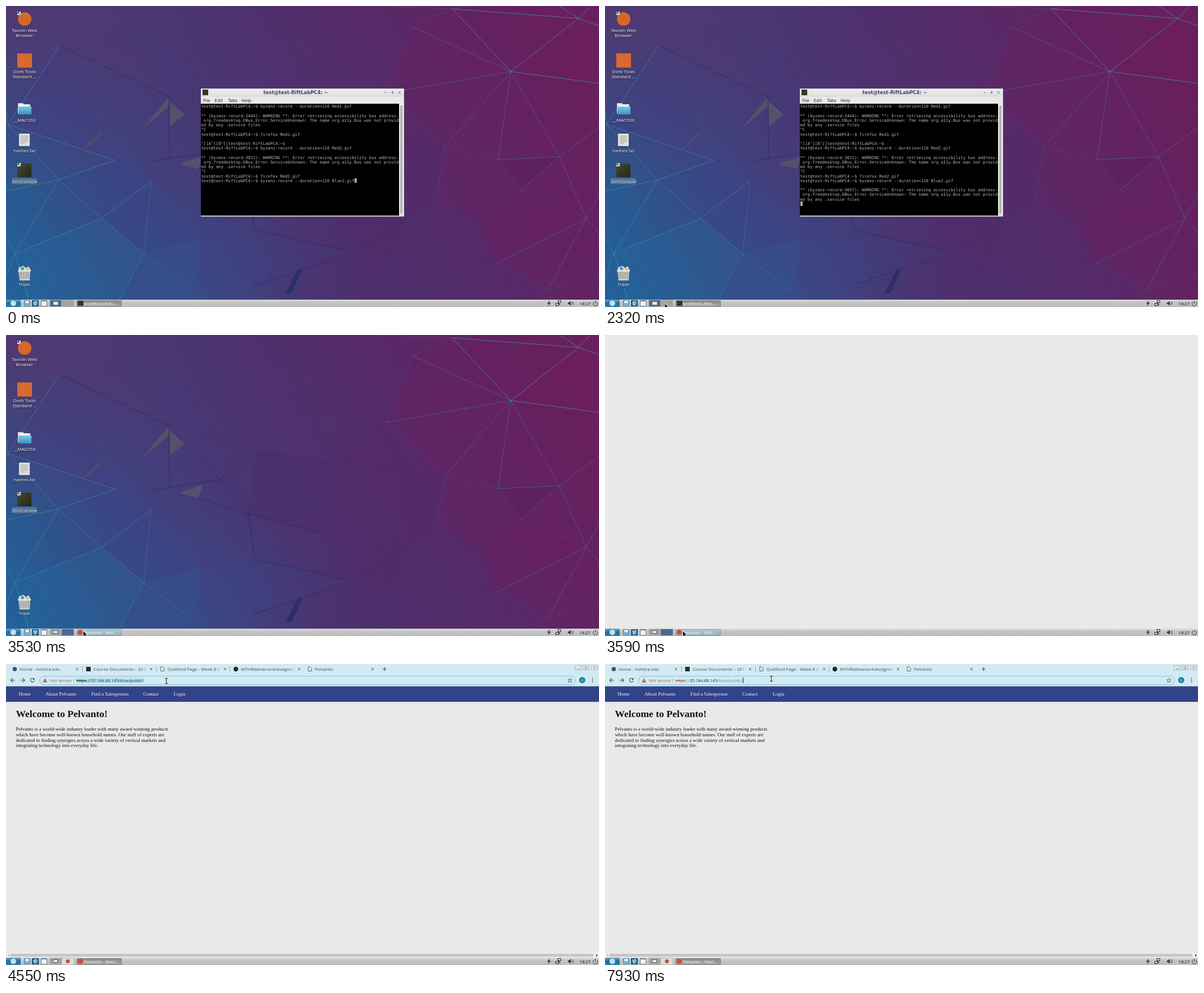
Write an HTML page with a canvas that moves like this. It is 1050 px wide and 533 px high and loops after 8 s.

```html
<!DOCTYPE html>
<html lang="en">
<head>
<meta charset="utf-8">
<title>Desktop session</title>
<style>
html, body { margin: 0; width: 100%; height: 100%; overflow: hidden; background: #e9e9e9; }
canvas { display: block; }
</style>
</head>
<body>
<canvas id="stage" width="1050" height="533"></canvas>
<script>
const W = 1050, H = 533, LOOP = 8000;
const UI = '"Open Sans", sans-serif', DJV = '"DejaVu Sans", sans-serif';
const MONO = '"DejaVu Sans Mono", monospace', SERIF = '"Liberation Serif", serif';
const screenCtx = document.getElementById('stage').getContext('2d');
let c = screenCtx;

function box(x, y, w, h, color) { c.fillStyle = color; c.fillRect(x, y, w, h); }
function frame(x, y, w, h, color) {
  c.strokeStyle = color; c.lineWidth = 1; c.strokeRect(x + .5, y + .5, w - 1, h - 1);
}
function disc(x, y, r, color) {
  c.fillStyle = color; c.beginPath(); c.arc(x, y, r, 0, 7); c.fill();
}
function shape(path, color) { c.fillStyle = color; c.fill(new Path2D(path)); }
function line(path, color, width = 1) {
  c.strokeStyle = color; c.lineWidth = width; c.stroke(new Path2D(path));
}
function text(s, x, y, font, color, align = 'left') {
  c.font = font; c.fillStyle = color; c.textAlign = align; c.fillText(s, x, y);
}
function shade(x0, y0, x1, y1, ...colors) {
  const g = c.createLinearGradient(x0, y0, x1, y1);
  colors.forEach((k, i) => g.addColorStop(i / (colors.length - 1), k));
  return g;
}
function glow(x, y, r, rgb, alpha) {
  const g = c.createRadialGradient(x, y, 0, x, y, r);
  g.addColorStop(0, `rgba(${rgb},${alpha})`);
  g.addColorStop(1, `rgba(${rgb},0)`);
  box(0, 0, W, H, g);
}
// Lines from one hub to several spokes, given as "x,y x,y ..."
function fan(hub, spokes, color) {
  line(spokes.split(' ').map(p => `M${hub}L${p}`).join(''), color, .8);
}

function wallpaper() {
  box(0, 0, W, H, shade(0, 520, 1050, 0, '#22629a', '#2b578f', '#3a4883', '#433e7b',
    '#483774', '#4d326f', '#522e6a', '#592867', '#602462', '#65215f', '#68205f'));
  glow(0, 0, 330, '86,52,108', .8);
  glow(330, 500, 220, '48,82,142', .45);
  glow(700, 500, 260, '78,42,105', .45);

  shape('M169,376L244,439L200,533H40L16,438Z', 'rgba(32,108,160,.25)');
  shape('M244,439L347,415L332,505L300,533H200Z', 'rgba(44,90,150,.25)');
  shape('M93,308L193,273L257,310L169,376Z', 'rgba(50,70,145,.2)');
  shape('M257,310L347,415L244,439L169,376Z', 'rgba(52,72,142,.2)');
  shape('M0,180L95,70L193,273L3,210Z', 'rgba(64,62,130,.3)');
  shape('M443,205L568,222L555,350L429,317Z', 'rgba(76,42,106,.35)');
  shape('M347,415L440,397L610,435L437,495Z', 'rgba(56,66,136,.15)');
  shape('M568,222L672,155L776,250L760,340L710,373L665,475L555,350Z', 'rgba(84,38,100,.25)');
  shape('M720,37L790,5L1050,0V533L960,502L870,455L840,385L763,340L776,250L672,155Z', 'rgba(108,28,92,.25)');
  shape('M894,116L1014,22L1050,35V137Z', 'rgba(120,28,90,.2)');
  shape('M871,272L980,267L912,326Z', 'rgba(75,30,95,.25)');
  shape('M912,326L1027,376L870,455L840,385Z', 'rgba(110,25,90,.2)');
  shape('M0,0H194L288,160L95,70Z', 'rgba(85,55,110,.2)');
  shape('M430,0L555,70L520,130L597,147L568,222L443,205L390,140Z', 'rgba(80,50,112,.2)');

  const dark = 'rgba(28,28,76,.6)', faint = 'rgba(40,34,92,.3)';
  fan('288,160', '95,70 380,256 290,275', dark);
  fan('288,160', '194,0 443,205 318,130', faint);
  fan('429,317', '380,256 310,278 440,397 555,350', dark);
  fan('429,317', '347,415', faint);
  fan('440,397', '610,435', dark);
  fan('440,397', '520,365 437,495 347,415', faint);
  fan('380,256', '255,275 413,228', dark);
  fan('555,70', '390,20 430,0 645,75 520,130 597,147', faint);
  fan('568,222', '443,205 597,147 555,350 776,250', faint);
  fan('581,447', '437,495', dark);
  fan('672,155', '597,147 645,75 568,222', faint);

  const bright = 'rgba(56,166,180,.85)', teal = 'rgba(50,140,158,.65)', soft = 'rgba(58,110,140,.4)';
  fan('894,116', '790,5 1014,22 1050,137', bright);
  fan('894,116', '720,37 980,267 871,272 776,250 672,155', teal);
  fan('1014,22', '790,5 980,0 1035,0 1050,35', bright);
  fan('790,5', '720,37 650,0 830,0', soft);
  fan('980,267', '871,272 1050,215 1027,376 912,326', teal);
  fan('912,326', '871,272 1027,376 840,385', soft);
  fan('1027,376', '1050,335 1050,402 960,502 870,455', teal);
  fan('960,502', '870,455 1050,478 920,533', soft);
  fan('776,250', '871,272 672,155 763,340', soft);
  fan('710,373', '763,340 763,413 620,435 665,475', faint);
  fan('720,37', '672,155', soft);

  const cyan = 'rgba(52,160,185,.7)';
  fan('3,210', '95,70 0,180 193,273 93,308', cyan);
  fan('93,308', '193,273 0,328 169,376 16,438', cyan);
  fan('16,438', '0,410 169,376 40,520 0,480', cyan);
  fan('169,376', '244,439 257,310', cyan);
  fan('244,439', '332,505 200,520 257,310', 'rgba(52,150,185,.5)');
  fan('244,439', '347,415 300,520', 'rgba(52,120,175,.3)');
  fan('193,273', '257,310 290,275 169,376', 'rgba(40,80,145,.4)');

  shape('M288,162V178L239,220ZM290,169L317,192L290,213ZM310,278L349,265L340,289L310,281Z', '#55506b');
  shape('M134,253L168,223V229L140,254Z', '#4f4a6c');
  shape('M495,509L517,466H525L505,509Z', '#2c2f68');
}

function label(s, y) {
  c.shadowColor = '#000'; c.shadowBlur = 2; c.shadowOffsetY = 1;
  text(s, 32.7, y, '8px ' + UI, '#fff', 'center');
  c.shadowColor = 'transparent'; c.shadowBlur = c.shadowOffsetY = 0;
}
function shortcut(x, y) {
  box(x, y, 6, 6, '#eee');
  line(`M${x + 5},${y + 5}L${x + 1.5},${y + 1.5}M${x + 1},${y + 4}V${y + 1}H${x + 4}`, '#111', 1);
}

function icons() {
  disc(33, 23, 12, '#d4682b');
  shortcut(20, 10);
  label('Tavolin Web', 46); label('Browser', 55);

  box(20, 84, 26, 25, '#d8692f');
  label('Dorb Tools', 118.5); label('Standard ...', 128);

  shape('M21,172H30L32,174H43V190H21Z', '#d9d9d9');
  box(23, 174, 18, 8, '#f2f2f2');
  box(22, 178, 23, 14, shade(0, 178, 0, 192, '#7cc8e4', '#3c93bd'));
  label('__MACOSX', 204.5);

  box(23, 226, 19, 22, '#dededc');
  for (let y = 230; y < 245; y += 3) box(26, y, y > 240 ? 8 : 13, 1, '#999');
  label('hashes.txt', 259);

  box(20, 279, 25, 24, shade(20, 279, 45, 303, '#454a3a', '#22270f'));
  shortcut(20, 278);
  box(11, 305, 43, 11, '#54779c');
  label('ZemConsole', 314);

  shape('M23,463L31,460L35,464L40,461L44,468H22Z', '#dcdcd8');
  disc(29, 465, 3, '#4b9cc4'); disc(38, 466, 2.5, '#d8bd6b');
  shape('M22,468H43L42,486H24Z', '#cbcbc4');
  for (let x = 25; x < 42; x += 3) line(`M${x},471V483`, '#85857e', 1);
  box(21, 468, 23, 2, '#e6e6e2');
  label('Trash', 496);
}

const prompt = 'test@test-RiftLabPC4:~$ ';
const warning = pid => [`** (byzanz-record:${pid}): WARNING **: Error retrieving accessibility bus address:`,
  ' org.freedesktop.DBus.Error.ServiceUnknown: The name org.a11y.Bus was not provid',
  'ed by any .service files'];
const record = name => `${prompt}byzanz-record --duration=120 ${name}.gif`;
const history = [record('Red1'), '', ...warning(2444), '^C', prompt + 'firefox Red1.gif', '',
  '^[[A^[[B^[[' + prompt, record('Red2'), '', ...warning(3811), '^C',
  prompt + 'firefox Red2.gif', record('Blue2')];

function terminal(t) {
  box(345, 146, 360, 227, '#c4c4c8');
  box(345, 147, 359, 14, shade(0, 147, 0, 161, '#eeeeee', '#dcdcdc'));
  box(345, 161, 359, 12, '#e9e9e9');
  box(348, 148, 10, 10, '#333a22');
  text('test@test-RiftLabPC4: ~', 513, 156, 'bold 8.4px ' + DJV, '#43435c', 'center');
  line('M670,153H674M682,153H687M684.5,150.5V155.5M694.5,150.5L699,155.5M699,150.5L694.5,155.5', '#77778a', 1);
  ['File', 'Edit', 'Tabs', 'Help'].forEach((s, i) =>
    text(s, [349, 369.5, 393, 417][i], 169.5, '7.6px ' + DJV, '#2a2a2a'));
  box(345, 173, 351, 198, '#000');
  box(696, 173, 8, 198, '#ededed');
  box(698, 176, 4, 192, '#b4b4b4');

  const done = t >= 40;
  const rows = done ? [...history, '', ...warning(4057)] : history;
  rows.forEach((s, i) => text(s, 345.4, 180.2 + i * 8.22, '7.27px ' + MONO, '#b8b8b8'));
  if (done) box(346, 346, 4, 8, '#a8a8a8'); else box(617, 305, 4, 8, '#a8a8a8');
}

function taskbar(t, pointer) {
  const first = t < 2500, open = t >= 3650;
  box(0, 520, W, 13, shade(0, 520, 0, 533, '#dcdcdc', '#c6c6c6', '#c0c0c0', '#bcbcbc'));
  box(0, 520, 26, 13, shade(0, 520, 0, 533, '#6aa3c4', '#1f6d9d', '#2a82ae'));
  disc(13, 526.5, 5, '#c3dfec');

  box(32, 521, 11, 11, '#4a8db4'); box(34, 522, 7, 5, '#e8f1f5'); box(33, 526, 9, 5, '#79b4d2');
  box(46, 521, 12, 11, '#1e506f'); disc(52, 526.5, 4.5, '#4c9bc4');
  line('M49,524L52,527L51,530M53,523L55,525', '#e0eef4', 1.5);
  box(62, 521, 11, 11, '#f3f3f3'); box(62, 521, 11, 2, '#4a88ac'); frame(62, 521, 11, 11, '#68808e');

  const on = '#486c92', off = '#a3a3a3';
  box(77, 520, 44, 13, '#b4b4b4');
  box(78, 521, 20, 11, first ? on : off);
  box(99, 521, 21, 11, first ? off : on);
  box(84, 524, 8, 5, '#ececec');
  if (!first) frame(83, 523, 9, 6, '#555');
  if (open) { box(99, 521, 21, 11, '#d8dedf'); disc(109.5, 526.5, 3.5, '#d34a3a'); }

  const hover = !first && !open && pointer && pointer[0] >= 125;
  const fill = first || open ? shade(0, 521, 0, 533, '#8a8a8a', '#a6a6a6') :
    hover ? shade(0, 521, 0, 533, '#b5cdd5', '#86a9b5') : shade(0, 521, 0, 533, '#c9c9c9', '#a0a0a0');
  box(125, 521, 80, 12, fill);
  frame(125, 521, 80, 12, hover ? '#7ea0ad' : '#838383');
  if (first) box(127, 522, 10, 9, '#333a22'); else disc(131.5, 526.5, 4.5, '#d34a3a');
  const name = first ? 'test@test-RiftL...' : open ? 'Pelvanto - Merl...' : 'Pelvanto - Mer...';
  text(name, 138, 529.5, '7.8px ' + UI, '#fff');

  shape('M963,521L958,527H961L959,532L965,525.5H961.5Z', '#33334a');
  frame(977, 521, 6, 5, '#33334a'); frame(973, 526, 6, 5, '#33334a');
  line('M979.5,526V529H982', '#33334a');
  shape('M995,525H997L1000,522V531L997,528H995Z', '#33334a');
  line('M1001.5,524.5Q1003,526.5 1001.5,528.5M1003.5,523Q1006,526.5 1003.5,530', '#33334a', .8);
  text('18:27', 1015.5, 529.5, '7.7px ' + UI, '#111');
  line('M1041.4,523.6A4,4 0 1 0 1045.6,523.6M1043.5,522V527', '#33334a', 1);
}

const chrome = '#d3eaf2';
function page(x, y) {
  line(`M${x},${y}H${x + 3.5}L${x + 6},${y + 2.5}V${y + 7.5}H${x}Z`, '#555d66', .9);
}
function tab(s, x, end) {
  text(s, x, 11.8, '7.95px ' + UI, '#40505a');
  box(end, 0, 140, 18, chrome);
  box(end - 10, 2, 10, 15, shade(end - 10, 0, end, 0, 'rgba(211,234,242,0)', chrome));
  line(`M${end + 5},6.8L${end + 9},11.2M${end + 9},6.8L${end + 5},11.2`, '#46535c', .9);
}

function browser(t) {
  box(0, 0, W, 520, '#e9e9e9');
  box(0, 0, W, 39.5, chrome);
  tab('Home - hofstra.edu', 24, 119);
  tab('Course Documents – 2018', 155, 250);
  tab('Quillford Page - Week 8 C', 286, 381);
  tab('MTHRdelvanor4/Assignment', 416, 512);
  tab('Pelvanto', 547, 642);
  for (const x of [135, 266, 396]) box(x, 4, 1, 10, '#9cb0b9');
  disc(15.5, 9, 3.8, '#4a4f63');
  box(142, 5, 8, 8, '#2b2b2b');
  page(274, 5); page(535, 5);
  disc(407, 9, 4.2, '#22262a');
  line('M667,9H673.6M670.3,5.8V12.4', '#38434a', 1.1);

  for (const x of [1007, 1021, 1036]) { box(x, 2, 12, 9, '#dfe7ea'); frame(x, 2, 12, 9, '#adb9be'); }
  line('M1011,8.5H1016M1025,8.5V5H1029V8.5ZM1040,4.5L1044,8.5M1044,4.5L1040,8.5', '#8a959a', 1);

  const ink = '#3b4a53';
  line('M16,28.7H8.5M12,25L8.3,28.7L12,32.4', ink, 1.1);
  line('M25.5,28.7H33M29.5,25L33.2,28.7L29.5,32.4', ink, 1.1);
  line('M49.4,26.4A3.4,3.4 0 1 0 50,29.8', ink, 1.1);
  shape('M50.5,24.6V28H47Z', ink);
  c.beginPath(); c.roundRect(59.5, 21.5, 949, 15, 7.5);
  c.strokeStyle = '#85c3d6'; c.lineWidth = 1; c.stroke();
  shape('M69,25L73,32.5H65Z', '#b5562b');
  box(68.6, 27.5, .9, 2.5, chrome); box(68.6, 30.8, .9, .9, chrome);
  text('Not secure', 77.5, 31.8, '7.7px ' + UI, '#b5562b');
  box(119, 25, 1, 8, '#9fb3bc');

  const selected = t >= 4550 && t < 4710, font = '7.5px ' + UI;
  if (selected) box(124, 24, 121, 10, '#bde1ee');
  let x = 124.5;
  const dark = '#1c2b33';
  [['https', '#b5562b'], ['://', '#6d8089'], ['35.184.88.145', dark], ['/blue/public/', '#71868f']].forEach(([s, color], i) => {
    const k = selected ? dark : color;
    text(s, x, 31.8, font, k);
    const w = c.measureText(s).width;
    if (!i) box(x, 28.8, w, .9, k);
    x += w;
  });
  const caretTimes = [4710, 5150, 5640, 6140, 6630, 7140, 7640];
  if (caretTimes.filter(k => t >= k).length % 2) box(244, 24, 1, 10, '#222');

  line('M998.5,25L999.6,27.7L1002.4,27.9L1000.2,29.7L1001,32.5L998.5,30.9L996,32.5L996.8,29.7L994.6,27.9L997.4,27.7Z', ink, .8);
  disc(1020.3, 28.5, 5.5, '#1f87a5');
  text('D', 1020.3, 30.5, '5.5px ' + UI, '#d5eef5', 'center');
  for (const y of [25.5, 28.7, 31.9]) disc(1038.5, y, .9, ink);

  box(0, 39.5, W, 27.5, '#33438b');
  ['Home', 'About Pelvanto', 'Find a Salesperson', 'Contact', 'Login'].forEach((s, i) =>
    text(s, [22.5, 70, 151, 243, 296.7][i], 56.2, '8.75px ' + SERIF, '#f2f2f2'));
  text('Welcome to Pelvanto!', 17.5, 94, 'bold 17.5px ' + SERIF, '#111');
  ['Pelvanto is a world-wide industry leader with many award-winning products',
    'which have become well-known household names. Our staff of experts are',
    'dedicated to finding synergies across a wide variety of vertical markets and',
    'integrating technology into everyday life.'].forEach((s, i) =>
    text(s, 17.5, 117.8 + i * 9.85, '8.8px ' + SERIF, '#111'));

  box(0, 512, W, 8, '#f0f0f0');
  box(8, 513, 1032, 5.5, '#c6c6c6');
  shape('M5.5,514V518L3,516Z', '#999');
  shape('M1045,513.8V518.2L1048,516Z', '#333');
}

// Pointer legs: start, end, target x, target y
const legs = [[630, 1410, 102, 522], [1450, 1730, 84, 527], [2080, 2320, 106, 527.5],
  [2890, 2970, 105, 524], [3170, 3570, 138, 524.5], [3960, 4550, 284, 30],
  [5640, 5640, 285.5, 30], [6320, 6400, 292.5, 28], [7890, 7930, 294.5, 26]];
const STEP = 42;

function pointerAt(t) {
  if (t < 630) return null;
  let x = 338, y = 331;
  for (const [from, to, tx, ty] of legs) {
    if (t < from) break;
    const steps = Math.floor((to - from) / STEP) + 1;
    const p = Math.min(1, (Math.floor((t - from) / STEP) + 1) / steps);
    const e = p * p * (3 - 2 * p);
    x += (tx - x) * e; y += (ty - y) * e;
  }
  return [x, y];
}

function drawPointer([x, y], inPage) {
  c.save();
  c.translate(x, y);
  if (inPage && y < 37) {
    const beam = 'M-2.5,-4.5H-.7L0,-3.8L.7,-4.5H2.5M0,-4V4M-2.5,4.5H-.7L0,3.8L.7,4.5H2.5';
    line(beam, 'rgba(255,255,255,.6)', 2.2);
    line(beam, '#1a1a1a', 1.1);
  } else {
    const arrow = 'M0,0V8.6L2,6.8L3.4,9.8L4.9,9.1L3.5,6.2H6.2Z';
    line(arrow, '#fff', 1.2);
    shape(arrow, '#111');
  }
  c.restore();
}

const desk = document.createElement('canvas');
desk.width = W; desk.height = H;
c = desk.getContext('2d');
wallpaper();
icons();
c = screenCtx;

function draw(t) {
  const pointer = pointerAt(t);
  if (t < 3590) c.drawImage(desk, 0, 0);
  else if (t < 3650) box(0, 0, W, H, '#e9e9e9');
  else browser(t);
  if (t < 2500) terminal(t);
  taskbar(t, pointer);
  if (pointer) drawPointer(pointer, t >= 3650);
}

const start = performance.now();
function tick() {
  draw((performance.now() - start) % LOOP);
  requestAnimationFrame(tick);
}
tick();
</script>
</body>
</html>
```
